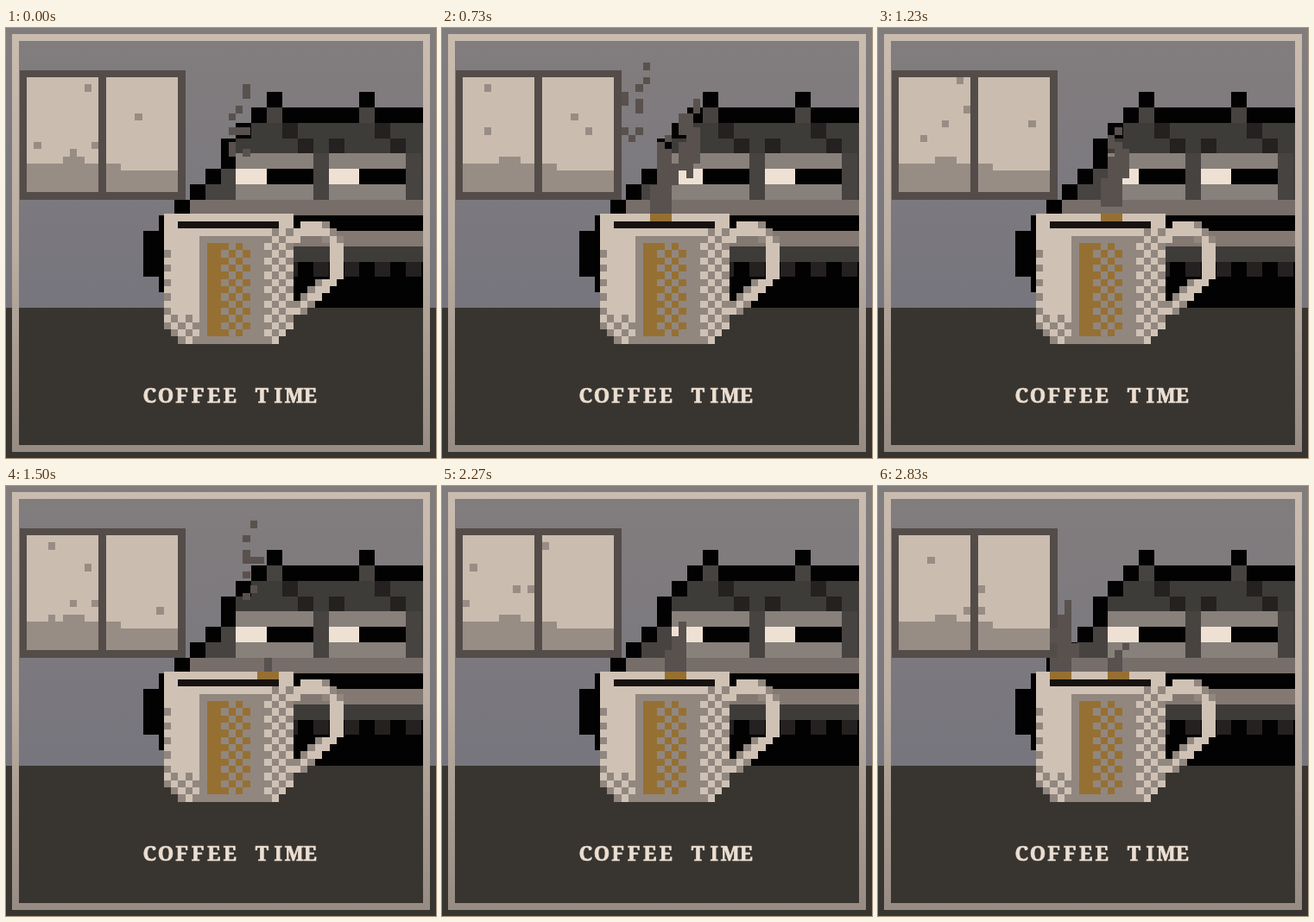
These frames come from a looping animation (498x498 px, 2860 ms). An HTML page with a canvas:

```html
<!DOCTYPE html>
<html lang="en">
<head>
<meta charset="utf-8">
<title>Coffee time</title>
<style>
  html, body { margin: 0; width: 100%; height: 100%; overflow: hidden; background: #383531; }
  canvas, svg { position: absolute; left: 0; top: 0; }
  text {
    font: bold 23.5px "Noto Serif", "Liberation Serif", serif;
    fill: #ecdfd2; stroke: #ecdfd2; stroke-width: .7px; text-anchor: middle;
  }
</style>
</head>
<body>
<canvas id="stage" width="498" height="498"></canvas>
<svg width="498" height="498"><text id="title" y="434">COFFEE TIME</text></svg>
<script>
const LOOP = 2860, STEP = 40;
const LIGHT = '#cfc2b5', GRAY = '#91877f', BROWN = '#967033', STEAM = '#58514e';
const ctx = document.getElementById('stage').getContext('2d');

const title = document.getElementById('title');
title.setAttribute('x', [...title.textContent].map((_, i) => 166.3 + i * 18.6).join(' '));

// Returns a function that fills a block of cells on a square grid.
const grid = (ox, oy, size) => (color, c, r, w = 1, h = 1) => {
  const x = Math.round(ox + c * size), y = Math.round(oy + r * size);
  ctx.fillStyle = color;
  ctx.fillRect(x, y, Math.round(ox + (c + w) * size) - x, Math.round(oy + (r + h) * size) - y);
};
const cell = grid(-1, -1.5, 8.345);
const big = grid(195, 74, 17.87);

const noise = (a, b = 0, c = 0) => {
  const n = Math.sin(a * 12.99 + b * 78.23 + c * 37.72) * 43758.55;
  return n - Math.floor(n);
};

function shade(y0, y1, ...colors) {
  const g = ctx.createLinearGradient(0, y0, 0, y1);
  colors.forEach((c, i) => g.addColorStop(i / (colors.length - 1), c));
  return g;
}

function wall() {
  ctx.fillStyle = shade(0, 324, '#827d7d', '#7d7a7f', '#77757d');
  ctx.fillRect(0, 0, 498, 324);
}

function floor() {
  ctx.fillStyle = '#383531';
  ctx.fillRect(0, 324, 498, 174);
}

function snow(t) {
  for (let i = 0; i < 24; i++) {
    const slot = Math.floor(noise(i, 3) * 20);
    const speed = 12 + noise(i, 5) * 12;
    const row = Math.floor(7 + (t + 700 - i * 145) * speed / 1000);
    if (row >= 7 && row < 20) cell('#988d84', slot + (slot < 10 ? 3 : 4), row);
  }
}

function outside(t) {
  const glass = '#cabdaf', town = '#988d84';
  cell('#534c49', 2, 6, 23, 18);
  cell(glass, 3, 7, 10, 16);
  cell(glass, 14, 7, 10, 16);
  snow(t);
  cell(town, 3, 19, 10, 4);
  cell(town, 8, 18, 3);
  cell(town, 14, 19, 2, 4);
  cell(town, 16, 20, 8, 3);
}

function cat() {
  const black = '#030202', fur = '#3e3c39', soft = '#474341', dark = '#242120', lid = '#88807a';
  const edge = 16.14;
  // each row starts one step further left, with one repeat
  for (let r = 1; r < 8; r++) {
    const c = 6 - r + (r > 3);
    big(r === 7 ? '#776e69' : fur, c, r, edge - c);
    big(black, c, r);
  }
  big(soft, 2, 6, 2);
  big(soft, 3, 5);
  big(black, 7, 1, edge - 7);
  for (const c of [6, 12]) {
    big(black, c, 0);
    big(soft, c, 1);
    big(dark, c + 1, 2);
  }
  for (const c of [4, 10]) {
    big(lid, c, 4, 5, 3);
    big('#eee1d4', c, 5, 2);
    big(black, c + 2, 5, 3);
    big(soft, c + 5, 4, Math.min(1, edge - c - 5), 3);
    big(dark, c + 5 - 1, 3);
  }
  big(dark, 10, 3);
  big(black, -2, 9, 1, 3);
  big(black, -1, 8, 1, 5);
  big(black, 0, 8, edge, 6);
  big('#837972', 5, 9, edge - 5);
  big(fur, 5, 10, edge - 5);
  for (let c = 7; c < 16; c += 2) big(dark, c, 11);
}

function logo() {
  cell(GRAY, 27, 29, 9, 15);
  cell(BROWN, 28, 30, 2, 13);
}

function mug() {
  cell(LIGHT, 22, 26, 18, 15);
  for (let r = 41; r < 44; r++) cell(LIGHT, r - 19, r, 62 - 2 * r + 38 + (r - 41) * 0);
  cell('#171210', 24, 27, 14);
  logo();
  for (let r = 28; r < 44; r++) {
    for (let c = 22 + Math.max(0, r - 41); c < 40 - Math.max(0, r - 40); c++) {
      const odd = (c + r) % 2;
      if (c > 29 && c < 34 && r > 29 && r < 43 && !odd) cell(BROWN, c, r);
      if (c > 35 && odd) cell(GRAY, c, r);
      if (c < 27 && odd && (r > 39 || (c === 22 && r > 29))) cell(GRAY, c, r);
    }
  }
}

function distance(x, y, [ax, ay], [bx, by]) {
  const dx = bx - ax, dy = by - ay;
  const k = ((x - ax) * dx + (y - ay) * dy) / (dx * dx + dy * dy);
  const s = Math.max(0, Math.min(1, k));
  return Math.hypot(x - ax - s * dx, y - ay - s * dy);
}

// The handle covers every cell close to a bent line.
function handle() {
  const bend = [[40.5, 29], [41.5, 28], [44, 28], [46, 30], [46, 34.5], [40.5, 39.5]];
  for (let r = 27; r < 40; r++) {
    for (let c = 40; c < 47; c++) {
      const d = Math.min(...bend.slice(1).map((p, i) => distance(c + .5, r + .5, bend[i], p)));
      if (d < 0.95) cell(d > 0.6 ? GRAY : LIGHT, c, r);
    }
  }
}

// birth time and column of each puff
const puffs = [
  [-560, 30], [110, 24], [230, 32], [370, 29], [870, 31],
  [1390, 35], [1465, 27], [2060, 31], [2530, 24], [2700, 32]
];

// A puff grows out of the mug, climbs and breaks into loose cells.
function steam(t) {
  const length = 11, width = 3, fade = 15;
  puffs.forEach(([birth, x], id) => {
    const rise = Math.floor((t - birth) * 0.035);
    if (rise < 1) return;
    const loss = (rise - fade) / 8;
    for (let k = 0; k < Math.min(rise, length); k++) {
      const row = 26 - rise + k;
      const w = Math.min(width, 1 + Math.floor(k / 2));
      const sway = rise > 2 ? Math.sin(k * 0.9 + id) * 0.6 : 0;
      const left = Math.round(x + (width - w) / 2 + (25 - row) / 10 + sway);
      for (let i = 0; i < w; i++) {
        if (noise(k, i, id) >= loss) cell(STEAM, left + i, row);
      }
    }
    if (rise <= length + 4) cell(BROWN, x, 26, width);
  });
}

function border() {
  ctx.strokeStyle = shade(0, 498, '#cabcaf', '#bbaea2', '#968b82');
  ctx.lineWidth = 8;
  ctx.strokeRect(11, 11, 476, 476);
}

function draw(now) {
  const t = Math.floor((now % LOOP + 10) / STEP) * STEP - 10;
  wall();
  outside(t);
  cat();
  floor();
  mug();
  handle();
  steam(t);
  border();
}

const begin = performance.now();
function tick() {
  draw(performance.now() - begin);
  requestAnimationFrame(tick);
}
tick();
</script>
</body>
</html>
```
